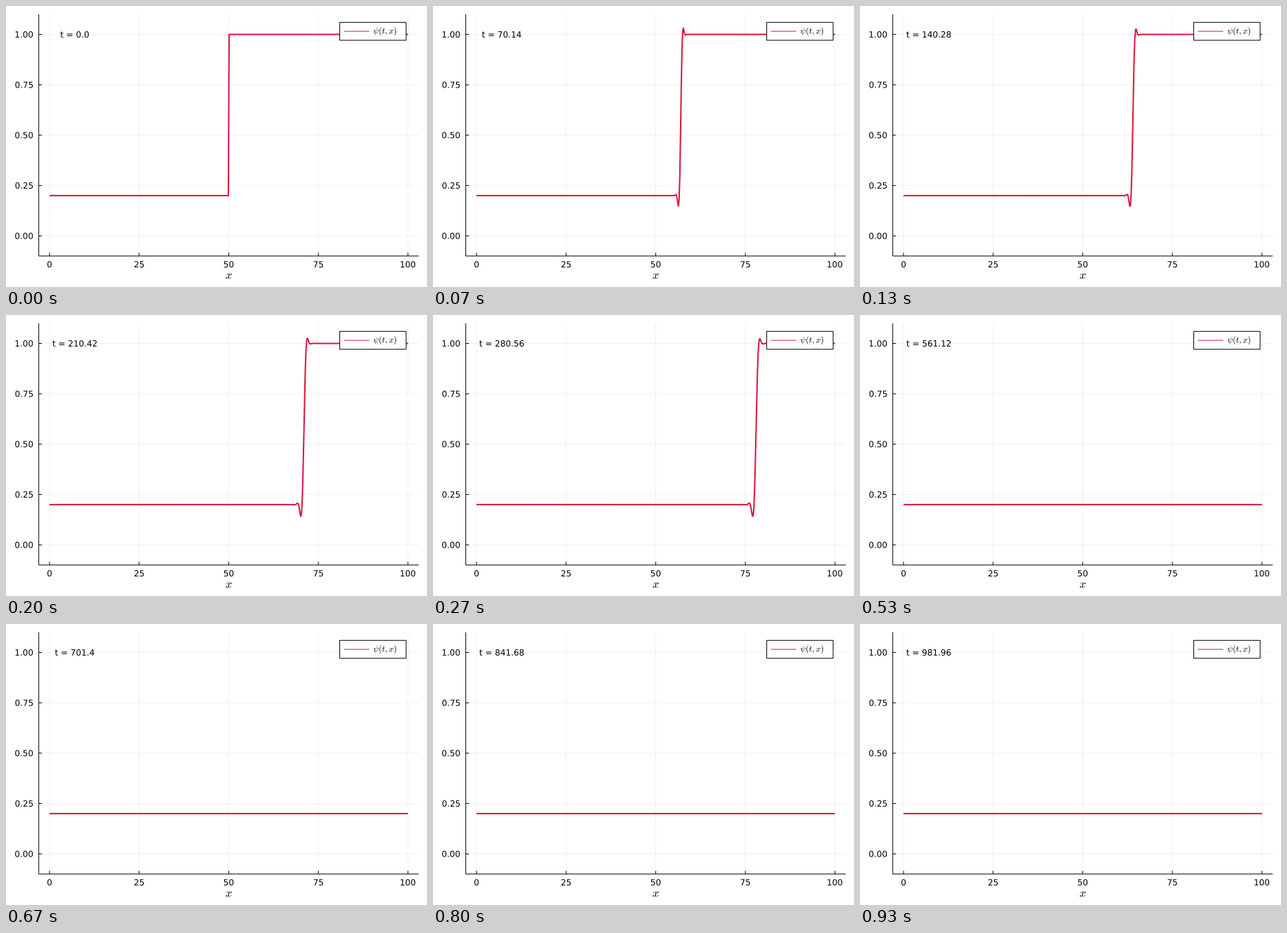
A matplotlib script that plays this animation: 600x400 px, repeating every 990 ms.

```python
import numpy as np
import matplotlib.pyplot as plt
from matplotlib.animation import FuncAnimation
from matplotlib.patches import PathPatch, Rectangle
from matplotlib.path import Path
from matplotlib.textpath import TextPath

W, H, DPI = 600, 400, 100
PX = 72 / DPI                      # one pixel in points
LEFT, RIGHT, TOP, BOTTOM = 46.7, 588.2, 11.8, 355.9
TICK_LEN = 4.5
CRIMSON = "#dc143c"

plt.rcParams.update({
    "font.family": "DejaVu Sans",
    "mathtext.fontset": "cm",
})

# Linear advection of a step, solved with Fromm's scheme
N, SPEED, CFL = 500, 0.1, 0.7
STEPS_PER_SHOT, SHOTS = 50, 15
x = np.linspace(0, 100, N)
dt = CFL * (x[1] - x[0]) / SPEED


def advance(u):
    """One time step with zero-gradient boundaries."""
    p = np.pad(u, (2, 1), mode="edge")
    slope = (p[2:] - p[:-2]) / 2
    face = p[1:-1] + (1 - CFL) / 2 * slope
    return u - CFL * np.diff(face)


def solve():
    u = np.where(x < 50, 0.2, 1.0)
    shots = [u]
    for _ in range(SHOTS - 1):
        for _ in range(STEPS_PER_SHOT):
            u = advance(u)
        shots.append(u)
    return shots


shots = solve()


def to_px(xv, yv):
    """Data coordinates to stage pixels, y pointing down."""
    px = LEFT + (xv + 3) / 106 * (RIGHT - LEFT)
    py = BOTTOM - (yv + 0.1) / 1.2 * (BOTTOM - TOP)
    return px, py


fig = plt.figure(figsize=(W / DPI, H / DPI), dpi=DPI, facecolor="white")
ax = fig.add_axes([0, 0, 1, 1])
ax.set_xlim(0, W)
ax.set_ylim(H, 0)
ax.axis("off")


def line(xs, ys, color="black", width=1.0, zorder=2):
    return ax.plot(xs, ys, color=color, lw=width * PX, zorder=zorder,
                   solid_capstyle="butt", snap=False)[0]


def outline(px, py, s, size=12, align=0.5):
    """Glyph outlines on baseline py; align is the anchor's share of the width."""
    text = TextPath((0, 0), s, size=size)
    box = text.get_extents()
    shift = px - box.x0 - align * box.width
    verts = text.vertices * [1, -1] + [shift, py]
    return Path(verts, text.codes)


def label(*args, zorder=4, **kw):
    patch = PathPatch(outline(*args, **kw), facecolor="black", lw=0,
                      zorder=zorder, snap=False)
    return ax.add_patch(patch)


# Grid, ticks and tick labels
GRID = dict(color="#f0f0f0", zorder=1)
HALF_CAP = 4.37
for v in (0, 25, 50, 75, 100):
    px, _ = to_px(v, 0)
    line([px, px], [TOP, BOTTOM], **GRID)
    line([px, px], [BOTTOM - TICK_LEN, BOTTOM])
    label(px, 372.1, str(v))
for v in (0, 0.25, 0.5, 0.75, 1):
    _, py = to_px(0, v)
    line([LEFT, RIGHT], [py, py], **GRID)
    line([LEFT, LEFT + TICK_LEN], [py, py])
    label(38.2, py + HALF_CAP, f"{v:.2f}", align=1)

line([LEFT, LEFT], [TOP, BOTTOM])
line([LEFT, RIGHT], [BOTTOM, BOTTOM])
label((LEFT + RIGHT) / 2, 388.2, "$x$", size=16.5)

# Moving parts
clock_x, clock_y = to_px(7, 1)


def clock_path(k):
    t = round(k * STEPS_PER_SHOT * dt, 2)
    return outline(clock_x, clock_y + HALF_CAP, f"t = {t}")


clock_paths = [clock_path(k) for k in range(SHOTS)]
curve = line(*to_px(x, shots[0]), color=CRIMSON, width=2, zorder=3)
clock = ax.add_patch(PathPatch(clock_paths[0], facecolor="black", lw=0,
                               zorder=4, snap=False))

# Legend
ax.add_patch(Rectangle((475.6, 23.3), 94.6, 25.5, facecolor="white",
                       edgecolor="black", lw=PX, zorder=5, snap=False))
line([481.6, 517.7], [36.05, 36.05], color=CRIMSON, zorder=6)
label(523.7, 39.2, r"$\psi(t,x)$", align=0, zorder=6)

# 15 pictures per second on a 10 ms clock
TICK = 10
starts = [TICK * round(k * 20 / 3) for k in range(SHOTS)]


def update(i):
    k = int(np.searchsorted(starts, i * TICK, side="right")) - 1
    curve.set_data(*to_px(x, shots[k]))
    clock.set_path(clock_paths[k])
    return curve, clock


anim = FuncAnimation(fig, update, frames=99, interval=TICK,
                     repeat=True, repeat_delay=0, blit=False)
plt.show()
```
